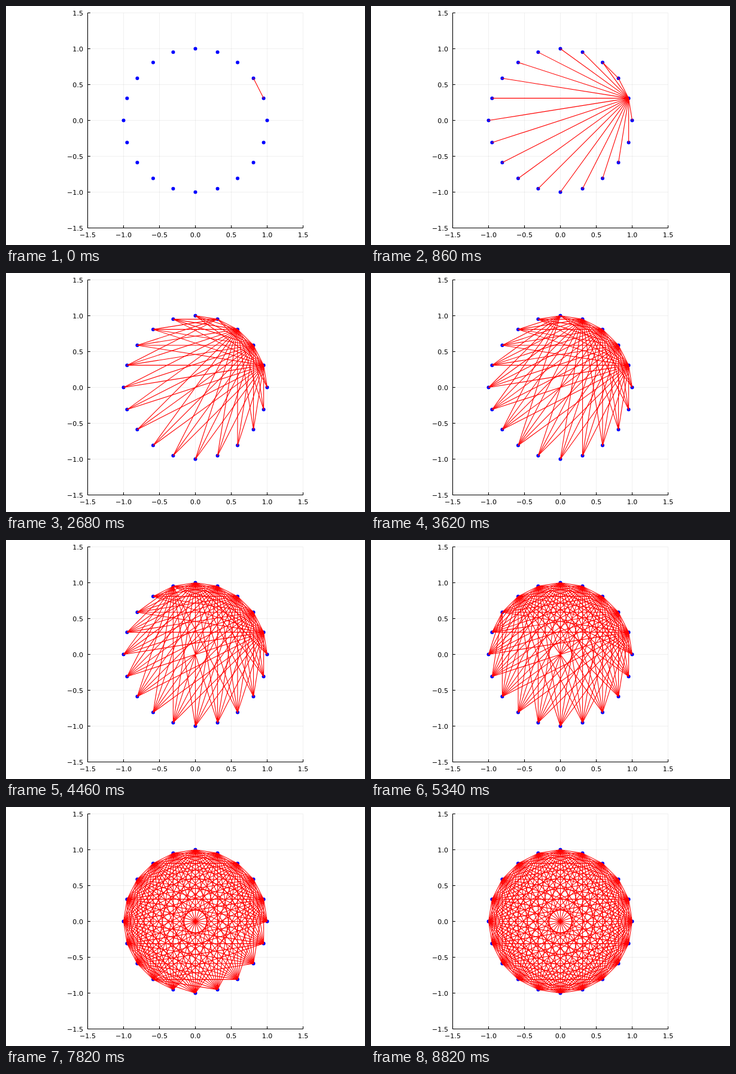
Write an HTML page that moves like this. It is 600 by 400 pixels and loops after 8.84 s.

```html
<!DOCTYPE html>
<html lang="en">
<head>
<meta charset="utf-8">
<title>Complete graph on a circle</title>
<style>
  html, body { margin: 0; width: 100%; height: 100%; overflow: hidden; background: #fff; }
  svg { display: block; width: 600px; height: 400px; }
  text { font: 11.1px "DejaVu Sans", sans-serif; }
  .grid { stroke: #000; stroke-opacity: .06; }
  .axis { stroke: #000; stroke-width: 1.1; }
  .edge { stroke: #f00; stroke-width: 1.1; }
</style>
</head>
<body>
<svg id="stage" viewBox="0 0 600 400"></svg>
<script>
const N = 20, LOOP = 8840;
const stage = document.getElementById('stage');
const X = v => 316.5 + 120 * v;
const Y = v => 191.5 - 120 * v;

function add(name, attrs, text) {
  const el = document.createElementNS('http://www.w3.org/2000/svg', name);
  for (const key in attrs) el.setAttribute(key, attrs[key]);
  if (text) el.textContent = text;
  return stage.appendChild(el);
}
const line = (cls, x1, y1, x2, y2) => add('line', { class: cls, x1, y1, x2, y2 });

const left = X(-1.5), right = X(1.5), top_ = Y(1.5), bottom = Y(-1.5);
const ticks = [-1.5, -1, -0.5, 0, 0.5, 1, 1.5];
for (const v of ticks) {
  line('grid', X(v), top_, X(v), bottom);
  line('grid', left, Y(v), right, Y(v));
}
line('axis', left, bottom, right, bottom);
line('axis', left, top_, left, bottom);
for (const v of ticks) {
  const label = v.toFixed(1).replace('-', '\u2212');
  line('axis', X(v), bottom, X(v), bottom - 4.4);
  line('axis', left, Y(v), left + 4.4, Y(v));
  add('text', { x: X(v), y: 387, 'text-anchor': 'middle' }, label);
  add('text', { x: 129, y: Y(v) + 4.2, 'text-anchor': 'end' }, label);
}

const points = Array.from({ length: N }, (_, i) => {
  const a = 2 * Math.PI * (i + 1) / N;
  return [X(Math.cos(a)), Y(Math.sin(a))];
});
for (const [cx, cy] of points) add('circle', { cx, cy, r: 3, fill: '#00f' });

const edges = [];
for (let i = 0; i < N; i++)
  for (let j = i + 1; j < N; j++)
    edges.push(line('edge', ...points[i], ...points[j]));

// Three edges arrive every 140 ms, at offsets 0, 20 and 120.
function edgeCount(t) {
  const phase = t % 140;
  return 3 * Math.floor(t / 140) + 1 + (phase >= 20) + (phase >= 120);
}

function draw() {
  const count = edgeCount(performance.now() % LOOP);
  edges.forEach((edge, i) => edge.setAttribute('visibility', i < count ? 'visible' : 'hidden'));
  requestAnimationFrame(draw);
}
draw();
</script>
</body>
</html>
```
